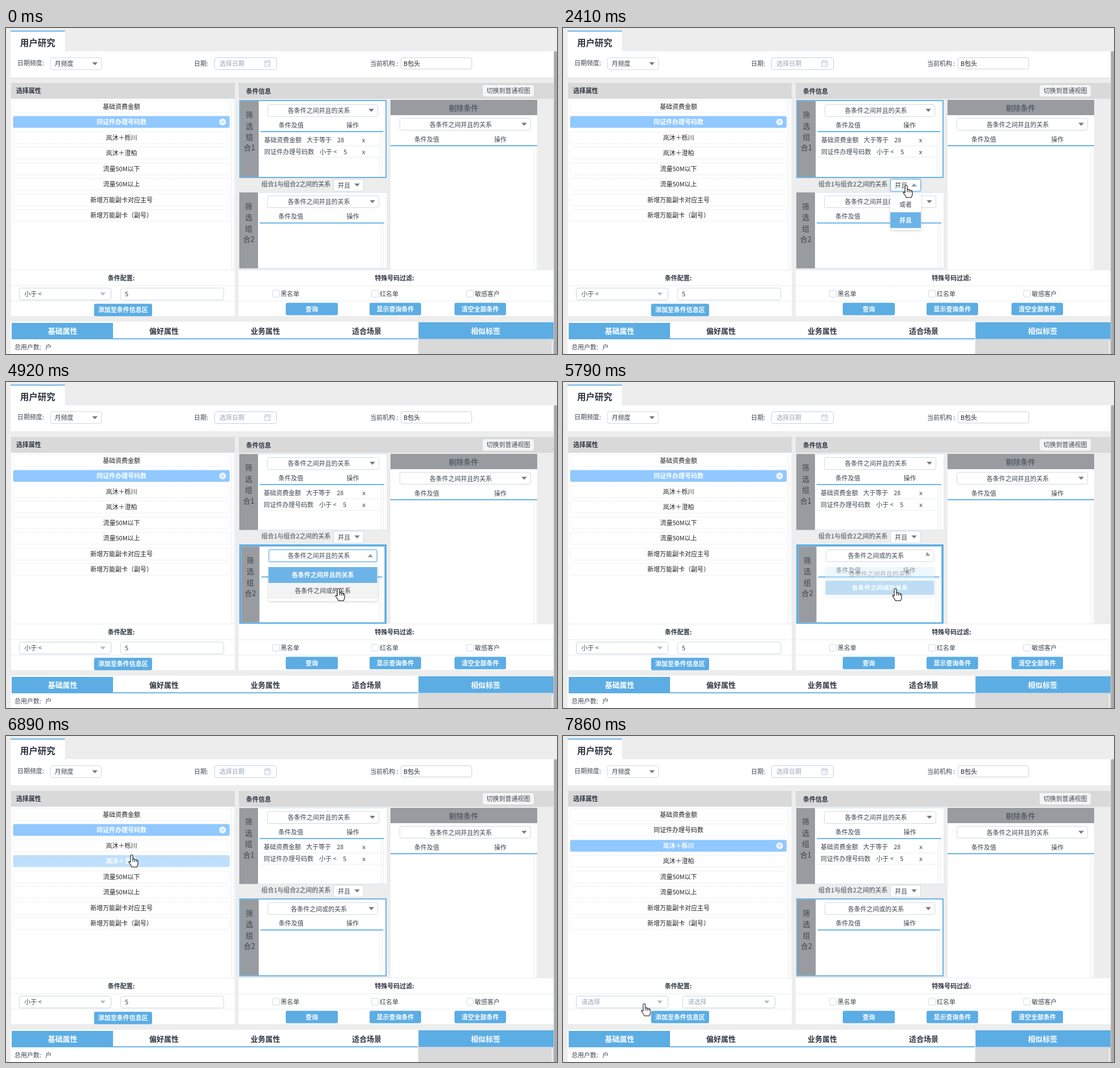
Recreate the animation shown at these times as an HTML page. Size 973 px wide and 576 px high, loop 8 s.

```html
<!DOCTYPE html>
<html lang="zh-CN">
<head>
<meta charset="utf-8">
<title>用户研究</title>
<style>
html, body { margin: 0; width: 100%; height: 100%; overflow: hidden; background: #ededed; }
svg { display: block; width: 973px; height: 576px; }
text { font-family: "Noto Sans CJK SC", "Noto Sans CJK", "Noto Sans", sans-serif; white-space: pre; }
</style>
</head>
<body>
<script>
const LOOP = 8000;
const BLUE = '#5cade4', INK = '#3e4650', DARK = '#2d3440', PALE = '#9aa7ba';
const GREY = '#989b9f', HEAD = '#d9d9d9', EDGE = '#d3d8df', SOFT = '#e9ecf0';
let css = '', count = 0;

// drawing helpers
const rect = (x, y, w, h, fill, r = 0) =>
  `<rect x="${x}" y="${y}" width="${w}" height="${h}" rx="${r}" fill="${fill}"/>`;
const box = (x, y, w, h, edge = EDGE, fill = '#fff', r = 3) =>
  `<rect x="${x + .5}" y="${y + .5}" width="${w - 1}" height="${h - 1}" rx="${r}" fill="${fill}" stroke="${edge}"/>`;
const glow = (x, y, w, h) => rect(x - 2, y - 2, w + 4, h + 4, '#5cade433', 4) + box(x, y, w, h, BLUE);
const text = (s, x, cy, fill = INK, size = 11, weight = 400, anchor = 'middle') =>
  `<text x="${x}" y="${cy + size * .38}" fill="${fill}" font-size="${size}" font-weight="${weight}" text-anchor="${anchor}">${s}</text>`;
const left = (s, x, cy, fill, size, weight) => text(s, x, cy, fill, size, weight, 'start');
const bold = (s, x, cy, fill, size) => text(s, x, cy, fill, size, 700);
const arrow = (x, y, turn = 0, fill = '#75797e') =>
  `<path d="M-4.8-2.6H4.8L0 2.8z" fill="${fill}" transform="translate(${x} ${y}) rotate(${turn})"/>`;
const button = (s, x, y, w, h = 22) => rect(x, y, w, h, BLUE, 3) + bold(s, x + w / 2, y + h / 2, '#fff');
const scroller = (x, y, h) => box(x, y, 5, h, SOFT, '#fff', 1);

// stepped timeline helpers
function steps(svg, list, extra = '') {
  const id = 'k' + count++;
  css += `@keyframes ${id}{${list.map(([ms, s]) => `${ms / LOOP * 100}%{${s}}`).join('')}}`;
  return `<g style="animation:${id} ${LOOP}ms step-end infinite;${extra}">${svg}</g>`;
}
function during(from, to, svg) {
  const list = [[from, 'opacity:1']];
  if (from) list.unshift([0, 'opacity:0']);
  if (to < LOOP) list.push([to, 'opacity:0']);
  return steps(svg, list);
}
const zoom = (svg, x, y, list) => steps(svg,
  list.map(([ms, o, s]) => [ms, `opacity:${o};transform:scaleY(${s})`]), `transform-origin:${x}px ${y}px`);

// static page
function topBar() {
  return rect(8, 5, 96, 37, '#fff') + rect(8, 4.6, 96, 1.8, BLUE) + bold('用户研究', 56, 26, DARK, 15.5)
    + rect(8, 41, 959, 46, '#fff')
    + left('日期频度:', 20, 62) + box(78, 52, 91, 22) + left('月频度', 86, 63) + arrow(157, 63)
    + left('日期:', 332, 63) + box(368, 52, 110, 22, '#c3d0e0') + left('选择日期', 377, 63, PALE)
    + `<path d="M457 58.5h9.5v9.5h-9.5zM457 61h9.5M459.5 56.5v2M464 56.5v2M462 64.5h2.5" fill="none" stroke="#b4bfce"/>`
    + left('当前机构 :', 643, 63) + box(697, 52, 126, 21, '#c9d2dd') + left('B包头', 702, 63, '#222')
    + rect(967.5, 41, 5.5, 540, '#a9abad', 2);
}

const names = ['基础资费金额', '同证件办理号码数', '岚沐＋栎川', '岚沐＋澄柏',
  '流量50M以下', '流量50M以上', '新增万能副卡对应主号', '新增万能副卡（副号）'];
const rowY = i => Math.round(139 + 27.43 * i);
const row = (i, fill, write, ink) =>
  `<rect x="12.5" y="${rowY(i) - 10.5}" width="382.5" height="21" rx="3" fill="${fill}"/>`
  + `<rect x="12.5" y="${rowY(i) - 10.5}" width="382.5" height="21" rx="3" fill="none" stroke="#e4e8f0" stroke-dasharray="1.5 1"/>`
  + write(names[i], 204, rowY(i), ink);
const hovered = i => row(i, '#bedffe', bold, '#fff');
const chosen = i => row(i, '#90c8ff', bold, '#fff')
  + `<circle cx="382.5" cy="${rowY(i)}" r="6" fill="#eef6ff"/>`
  + `<path d="M380.5 ${rowY(i) - 2}l4 4m0-4l-4 4" stroke="#90c8ff"/>`;

function attributes() {
  return rect(9, 97, 395, 28, HEAD) + left('选择属性', 18, 111, DARK, 11, 700)
    + rect(9, 125, 395, 384, '#fff') + scroller(398, 126, 301)
    + names.map((_, i) => row(i, '#fff', text, '#222')).join('')
    + during(0, 7470, chosen(1))
    + during(6740, 6890, hovered(4)) + during(6890, 7050, hovered(3)) + during(7050, 7470, hovered(2))
    + during(7470, LOOP, chosen(2)) + during(7590, 7730, hovered(4));
}

function config() {
  const lines = [427, 455, 482].map(y => rect(9, y, 395, 1, SOFT)).join('');
  const choice = (x, w, s, ink) => box(x, 459, w, 22, '#c9d3df') + left(s, x + 9.5, 470, ink)
    + arrow(x + w - 15, 470, 0, '#b3b9c1');
  return lines + bold('条件配置:', 203.5, 442, DARK)
    + during(0, 7470, choice(23, 163, '小于 &lt;') + box(202, 459, 183, 22) + left('5', 210, 470)
      + button('添加至条件信息区', 155.5, 487.3, 102.5))
    + during(7470, LOOP, choice(23, 163, '请选择', PALE) + choice(211, 164, '请选择', PALE)
      + button('添加至条件信息区', 155.5, 485.5, 102.5));
}

function filters() {
  const check = (x, s) => box(x, 463, 13, 13, EDGE, '#fff', 2) + left(s, x + 15, 469.5);
  return rect(411, 427, 556, 82, '#fff') + [427, 455, 482].map(y => rect(411, y, 556, 1, SOFT)).join('')
    + bold('特殊号码过滤:', 686, 442, DARK)
    + check(470, '黑名单') + check(645, '红名单') + check(813, '敏感客户')
    + button('查询', 494, 485.5, 92) + button('显示查询条件', 642, 485.5, 91) + button('清空全部条件', 792, 485.5, 91);
}

function tabs() {
  return rect(8, 519, 719, 57, '#fff') + rect(10, 521, 179, 29, BLUE) + rect(189, 548.3, 538, 1.8, BLUE)
    + ['基础属性', '偏好属性', '业务属性', '适合场景'].map((s, i) =>
      bold(s, 100 + 179 * i, 535.5, i ? DARK : '#fff', 13)).join('')
    + rect(728.6, 520, 238.4, 29.5, BLUE) + bold('相似标签', 847, 535, '#fff', 13)
    + rect(728.6, 550, 238.4, 26, HEAD) + box(962, 550, 5, 30, '#c9c9c9', '#ededed', 1)
    + left('总用户数:   户', 15, 564);
}

// condition panels; b is the border width
const THIN = 1.83, THICK = 2 * THIN;
const TOP = 127.3, LOW = 290.6, RAISED = LOW - THICK;
const ANY = '各条件之间并且的关系', OR = '各条件之间或的关系';

function group(y, b, label, rows = []) {
  const t = y + b, mid = 428.5 + b * .75;
  const list = rows.map(([name, op, value, opX, valX], i) => {
    const cy = t + 68.7 + 21 * i, x = 455 + b / 2;
    return left(name, x, cy) + left(op, x + opX, cy) + left(value, x + valX, cy) + text('x', 632 - b / 4, cy)
      + `<path d="M449 ${t + 79 + 20.5 * i}H${662 - b}" stroke="#e2e5ea" stroke-dasharray="2 1"/>`;
  }).join('');
  return rect(412, y, 260, 134 + 2 * b, BLUE) + rect(412 + b, t, 260 - 2 * b, 134, '#fff')
    + rect(412 + b, t, 33 - b * .3, 134, GREY)
    + ['筛', '选', '组', '合' + label].map((s, i) => text(s, mid, t + 24.2 + 19.4 * i, INK, 13)).join('')
    + text('条件及值', 503 + b / 4, t + 42.3) + text('操作', 612.5 - b / 4, t + 42.3)
    + scroller(662 - b, t + 57, 77) + rect(448 + b * .75, t + 53, 220 - b * 1.75, THIN, BLUE) + list;
}
function picker(y, b, s, turn = 0, focus = false) {
  const x = Math.round(461 + b * .7), t = y + b;
  return (focus ? glow : box)(x, Math.round(t + 5.6), 659 - b - x, 22) + text(s, 552.5, t + 16.7)
    + arrow(647 - b, t + (turn === 45 ? 14.7 : 16.2), turn, turn ? '#92979d' : undefined);
}

function excluded(b) {
  return rect(679, 127, 259, 300, b ? BLUE : '#fff') + rect(679 + b, 127 + b, 259 - 2 * b, 300 - 2 * b, '#fff')
    + rect(679 + b, 127 + b, 259 - 2 * b, 27, GREY) + text('剔除条件', 808, 141 + b, INK, 13)
    + box(695 + b, 159 + b, 232 - 2 * b, 22) + text(ANY, 803, 170.5 + b) + arrow(915 - b, 170 + b)
    + text('条件及值', 743, 196.5 + b) + text('操作', 873, 196.5 + b)
    + rect(679 + b, 207 + b, 259 - 2 * b, THIN, BLUE) + scroller(932 - b, 211 + b, 216 - 2 * b);
}

function conditions() {
  const rows = [['基础资费金额', '大于等于', '28', 75, 129], ['同证件办理号码数', '小于 &lt;', '5', 98, 140]];
  const first = b => group(TOP, b, 1, rows) + picker(TOP, b, ANY);
  const link = left('组合1与组合2之间的关系', 451, 276.2)
    + box(578, 266.8, 54, 22) + text('并且', 597, 277.7) + arrow(620, 277.3)
    + during(2130, 3100, glow(578, 266.8, 54, 22) + text('并且', 597, 277.7) + arrow(620, 277.3, 180, '#92979d'));
  return rect(411, 97, 556, 28, HEAD) + left('条件信息', 424, 112, DARK, 11, 700)
    + rect(842, 101, 90, 20, '#f5f5f5', 3) + text('切换到普通视图', 887, 111)
    + excluded(0) + during(1430, 1990, excluded(THIN))
    + during(0, 3960, first(THIN)) + during(3960, LOOP, first(0))
    + steps(link, [[0, 'transform:none'], [3960, `transform:translateY(${-THICK}px)`]])
    + during(0, 3240, group(LOW, 0, 2) + picker(LOW, 0, ANY))
    + during(3240, 3960, group(LOW, THIN, 2) + picker(LOW, THIN, ANY))
    + during(3670, 3960, box(462, 298, 195, 22, BLUE, 'none'))
    + during(3960, 6740, group(RAISED, THICK, 2))
    + during(3960, 5790, picker(RAISED, THICK, ANY, 180, true))
    + during(5790, 5930, picker(RAISED, THICK, OR, 45))
    + during(5930, 6740, picker(RAISED, THICK, OR))
    + during(6740, LOOP, group(RAISED, THIN, 2) + picker(RAISED, THIN, OR));
}

// dropdown menus
const sheet = (x, y, w, h) =>
  `<g style="filter:drop-shadow(0 1px 2px rgba(0,0,0,.2))">${rect(x, y, w, h, '#fff', 3)}</g>`;
const option = (s, x, y, w, fill, write = text, ink = INK) => rect(x, y, w, 28, fill) + write(s, x + w / 2, y + 14, ink);
const ON = '#6cb4e7';

function menus() {
  const joint = sheet(577.5, 295, 55, 62) + option('或者', 578, 298, 54, '#fff')
    + during(2560, 2700, option('或者', 578, 298, 54, '#f3f3f3'))
    + option('并且', 578, 325.5, 54, ON, bold, '#fff');
  const base = sheet(463.5, 324, 192.5, 63);
  const open = base + option(ANY, 463.5, 327, 192, ON, bold, '#fff') + option(OR, 463.5, 355, 192, '#fff')
    + during(4680, 5790, option(OR, 463.5, 355, 192, '#f3f3f3'));
  const shut = base + option(ANY, 463.5, 327, 192, '#d9ecf9') + option(OR, 463.5, 355, 192, ON, bold, '#fff');
  return zoom(joint, 605, 295, [[0, 0, 1], [2130, .2, .7], [2270, .75, .93], [2410, 1, 1],
      [3100, .45, .88], [3240, .08, .8], [3380, 0, 1]])
    + zoom(open, 560, 324, [[0, 0, 1], [3960, .25, .7], [4090, .8, .94], [4240, 1, 1], [5790, 0, 1]])
    + zoom(shut, 560, 324, [[0, 0, 1], [5790, .45, .88], [5930, .08, .8], [6060, 0, 1]]);
}

function pointer() {
  const hand = `<path d="M-2 13V2Q-2 0 0 0T2 2V7.5Q4.5 6.5 5.3 8.3Q7.7 7.5 8.4 9.3Q11 9 11 11.5V15Q11 18 9 21.5H0Q-.5 19-5 13.5Q-5.5 10.5-2 13zM2 8v4M5.3 8.5v4M8.4 9.5v3" fill="#fff" stroke="#111" stroke-width="1.1" stroke-linejoin="round"/>`;
  const ring = during(3820, 3960, '<circle cx="1" cy="1" r="8.5" fill="none" stroke="#222" stroke-width="1.2"/>');
  const path = [[1430, 895, 390], [1570, 835, 352], [1710, 760, 318], [1850, 690, 296], [1990, 638, 282], [2130, 606, 278],
    [2560, 610, 300], [2700, 603, 325], [2830, 598, 334],
    [3380, 599, 330], [3530, 602, 319], [3670, 604, 310], [3820, 604, 309],
    [4550, 602, 322], [4680, 595, 346], [4800, 589, 361], [4920, 587, 365],
    [6440, 560, 350], [6590, 450, 292], [6740, 300, 240], [6890, 222, 210], [7050, 222, 204], [7190, 222, 201],
    [7590, 214, 245], [7730, 172, 395], [7860, 143.5, 473]];
  return steps(hand + ring, [[0, 'opacity:0'],
    ...path.map(([ms, x, y]) => [ms, `opacity:1;transform:translate(${x}px,${y}px)`])]);
}

const art = topBar() + attributes() + config() + conditions() + filters() + tabs() + menus() + pointer();
document.body.innerHTML = `<style>${css}</style><svg viewBox="0 0 973 576">${art}</svg>`;
</script>
</body>
</html>
```
